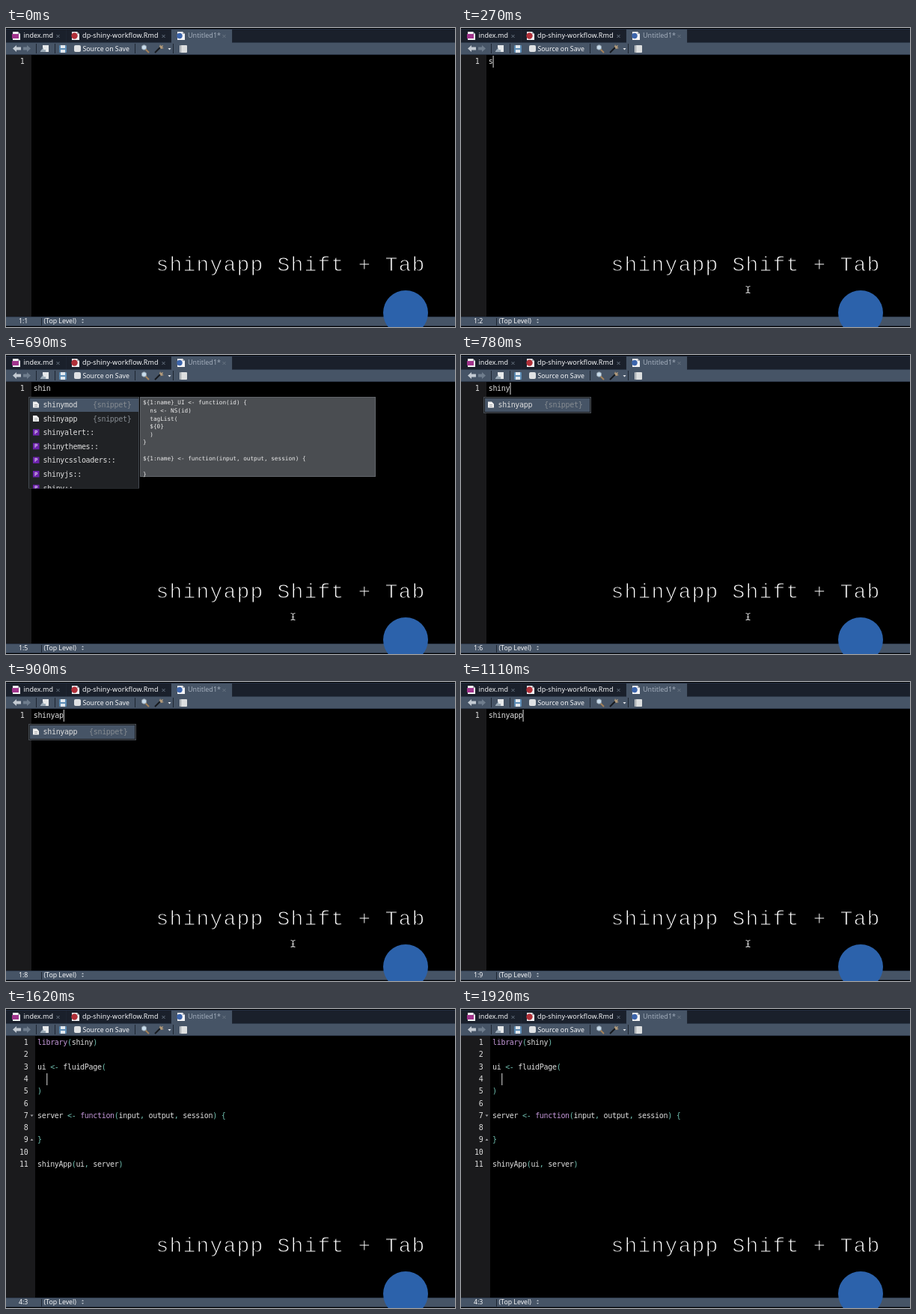
An HTML page for the animation above (1.95 s loop, 600 by 400 pixels).

```html
<!DOCTYPE html>
<html lang="en">
<head>
<meta charset="utf-8">
<title>Snippet demo</title>
<style>
html, body { margin: 0; width: 100%; height: 100%; overflow: hidden; background: #000; }
svg { display: block; width: 600px; height: 400px; }
text { white-space: pre; }
.ui { font: 500 9px "Noto Sans", "Open Sans", sans-serif; fill: #f4f5f7; }
.bar { font-size: 8.75px; }
.code { font: 10px "DejaVu Sans Mono", monospace; letter-spacing: -.31px; fill: #dedede; }
.hint { font: 7.7px "DejaVu Sans Mono", monospace; fill: #ececec; }
.title { font: 28px "Liberation Mono", monospace; letter-spacing: 1.2px; fill: #fff; stroke: #000; stroke-width: 1px; }
.dim { fill: #858b91; }
.key { fill: #c397d8; }
.op { fill: #70c0b1; }
.num { text-anchor: end; fill: #dedede; }
.sep { stroke: #1d2531; }
.close { stroke: #687482; stroke-width: 1; }
.slate { fill: #465466; }
.popup { fill: #202225; stroke: #454b52; }
.pick { fill: #465466; }
</style>
</head>
<body>
<svg viewBox="0 0 600 400">
  <defs>
    <g id="page"><path d="M0 0h7l3 3v8h-10z" fill="#f4f4f6"/><path d="M7 0v3h3z" fill="#a5a9b0"/></g>
    <path id="x" class="close" d="M-2-2 2 2M2-2-2 2"/>
    <g id="snip"><path d="M0 0h5l3 3v5h-8z" fill="#f0f0f0"/><path d="M2 4h4M2 6h4" stroke="#9a9ca0" stroke-width=".8"/></g>
    <clipPath id="listClip"><rect x="30" y="56" width="148" height="122.5"/></clipPath>
  </defs>

  <rect width="600" height="400"/>

  <!-- tabs -->
  <rect y="1" width="600" height="18" fill="#1a202b"/>
  <path d="M0 1.500H600" stroke="#232e42"/>
  <rect class="slate" x="221" y="2" width="81" height="17"/>
  <path class="sep" d="M80.500 2v17M220.500 2v17M302.500 2v17"/>
  <use href="#page" x="9" y="5"/><rect x="8" y="8" width="9" height="6" fill="#a0348c"/>
  <use href="#page" x="88" y="5"/><circle cx="91.500" cy="10.500" r="4.200" fill="#b02f38"/>
  <use href="#page" x="229" y="5"/><circle cx="232" cy="10.500" r="3.700" fill="#3c65ac"/>
  <g class="ui">
    <text x="23.500" y="13">index.md</text>
    <text x="102" y="13" letter-spacing=".1">dp-shiny-workflow.Rmd</text>
    <text x="243" y="13" style="fill:#a2adbb">Untitled1*</text>
  </g>
  <use href="#x" x="69.500" y="11"/><use href="#x" x="210.500" y="11"/>
  <use href="#x" x="291.500" y="11" style="stroke:#8b97a5"/>

  <!-- toolbar -->
  <rect class="slate" y="19" width="600" height="17"/>
  <path d="M0 19.500H221M302 19.500H600M0 35.500H600" stroke="#2c3748"/>
  <path class="sep" d="M40.500 21v13M65.500 21v13M172.500 21v13M223.500 21v13"/>
  <path d="M9 27.500l5-4.500v2.500h6v4h-6v2.500z" fill="#c3cad2"/>
  <path d="M33 27.500l-5-4.500v2.500h-5v4h5v2.500z" fill="#6f7d8d"/>
  <path d="M49 23h8v9h-8z" fill="#e6e8ea"/><path d="M46 31l4-5v3h3v3h-7z" fill="#9cabb8"/>
  <rect x="71" y="23" width="10" height="10" rx="1" fill="#5b8bb4"/>
  <path d="M73 23h6v4h-6zM73 29h6v4h-6z" fill="#e2e8ee"/>
  <rect x="91" y="23" width="9" height="9" rx="2" fill="#e0e2e4"/>
  <text class="ui bar" x="102.500" y="30.500">Source on Save</text>
  <path d="M186 28l5 5" stroke="#a5815a" stroke-width="2"/>
  <circle cx="184.500" cy="26" r="3.200" fill="#c8dcec" stroke="#8d9aa6"/>
  <path d="M199 33l8-8" stroke="#16191e" stroke-width="2"/>
  <path d="M206 22l1 2 3-1-1 3 2 1-4 1-2-3z" fill="#b0997a"/>
  <path d="M216.500 27h4l-2 2.500z" fill="#e8eaec"/>
  <rect x="232" y="23" width="10" height="10" rx="1" fill="#dcdedf"/><path d="M233.500 23v10" stroke="#8d949b"/>

  <!-- editor -->
  <rect id="gutter" y="36" width="34" height="350" fill="#1a1a1c"/>
  <g id="code" class="code"></g>
  <rect id="caret" width="1.400" height="16" fill="#9f9f9f"/>

  <g id="list" class="code" clip-path="url(#listClip)">
    <rect class="popup" x="30.500" y="56.500" width="147" height="122"/>
    <rect class="pick" x="32" y="58" width="145" height="18"/>
  </g>
  <g id="single" class="code">
    <rect class="popup" x="30.500" y="56.500" width="143" height="21"/>
    <rect class="pick" x="32" y="58" width="140" height="18"/>
    <use href="#snip" x="36" y="62.500"/>
    <text x="49.500" y="70">shinyapp</text><text class="dim" x="111" y="70">{snippet}</text>
  </g>
  <g id="tip" class="hint">
    <rect x="179.500" y="56.500" width="314" height="106" fill="#4a4d51" stroke="#62666b"/>
  </g>

  <text class="title" x="200.500" y="325">shinyapp Shift + Tab</text>

  <!-- status bar -->
  <rect class="slate" y="386" width="600" height="13"/>
  <path d="M0 386.500H600M0 398.500H600" stroke="#2c3748"/>
  <path class="sep" d="M47.500 388v10"/>
  <g class="ui bar">
    <text id="pos" x="17" y="395"></text>
    <text x="50.500" y="395">(Top Level)</text>
  </g>
  <path d="M101 391l1.500-2 1.500 2zM101 393l1.500 2 1.500-2z" fill="#b4bcc5"/>
  <circle cx="534" cy="381" r="30" fill="#2c62ab"/>

  <path id="mouse" d="M380.500 345.500q3 0 3 2v5q0 2-3 2M386.500 345.500q-3 0-3 2v5q0 2 3 2M382 350.500h3" fill="none" stroke="#c4c4c4" stroke-width="1.200"/>
</svg>
<script>
const LOOP = 1950, EXPAND = 1620, CHAR = 5.71, LINE = 16.3;
const WORD = "shinyapp";
const KEYS = [240, 330, 390, 450, 750, 810, 870, 960];
const PROGRAM = [
  "library(shiny)", "", "ui <- fluidPage(", "  ", ")", "",
  "server <- function(input, output, session) {", "", "}", "", "shinyApp(ui, server)"
];
const ITEMS = ["shinymod", "shinyapp", "shinyalert::", "shinythemes::", "shinycssloaders::", "shinyjs::", "shiny::"];
const HINT = ["${1:name}_UI &lt;- function(id) {", "  ns &lt;- NS(id)", "  tagList(", "  ${0}", "  )", "}", "",
  "${1:name} &lt;- function(input, output, session) {", "", "}"];

const el = id => document.getElementById(id);
const show = (id, on) => el(id).setAttribute("visibility", on ? "visible" : "hidden");
const within = (t, a, b) => t >= a && t < b;
const text = (x, y, s, cls = "") => `<text x="${x}" y="${y}" class="${cls}">${s}</text>`;

const paint = s => s.replace(/library|function|<-|[(){},]/g, m =>
  `<tspan class="${m.length > 2 ? "key" : "op"}">${m.replace("<", "&lt;")}</tspan>`);

function codeLines(lines, numX, x) {
  return lines.map((s, i) => {
    const y = 48 + i * LINE;
    return text(numX, y, i + 1, "num") + text(x, y, paint(s));
  }).join("");
}

el("list").innerHTML += ITEMS.map((s, i) => {
  const y = 70 + i * 18.6;
  const icon = i < 2
    ? `<use href="#snip" x="36" y="${y - 7.5}"/>` + text(116, y, "{snippet}", "dim")
    : `<rect x="36" y="${y - 8}" width="8.500" height="8.500" fill="#6d22ad"/>
       <text x="38" y="${y - 1.5}" style="font-size:7px;fill:#fff">P</text>`;
  return icon + text(49.5, y, s);
}).join("");
el("tip").innerHTML += HINT.map((s, i) => text(183, 66.3 + i * 10.6, s)).join("");

const FOLDS = `<path d="M32.500 141.500h4l-2 2.500zM32.500 176h4l-2-2.500z" fill="#a4a4a8"/>`;
let last = "";

function draw(now) {
  const t = now % LOOP;
  const done = t >= EXPAND;
  const count = KEYS.filter(k => t >= k).length;
  const state = done ? "done" : count;

  if (state !== last) {
    last = state;
    el("code").innerHTML = done
      ? codeLines(PROGRAM, 29.5, 42) + FOLDS
      : codeLines([WORD.slice(0, count)], 24.5, 36.7);
    el("gutter").setAttribute("width", done ? 39 : 34);
    el("pos").textContent = done ? "4:3" : `1:${count + 1}`;
    el("caret").setAttribute("x", done ? 54 : 36.7 + count * CHAR);
    el("caret").setAttribute("y", done ? 86 : 37);
  }
  show("caret", count > 0 && !within(t, 600, 750));
  show("list", within(t, 450, 750));
  show("tip", within(t, 600, 750));
  show("single", within(t, 750, 1110));
  show("mouse", within(t, 120, EXPAND));
  requestAnimationFrame(draw);
}
draw(0);
</script>
</body>
</html>
```
